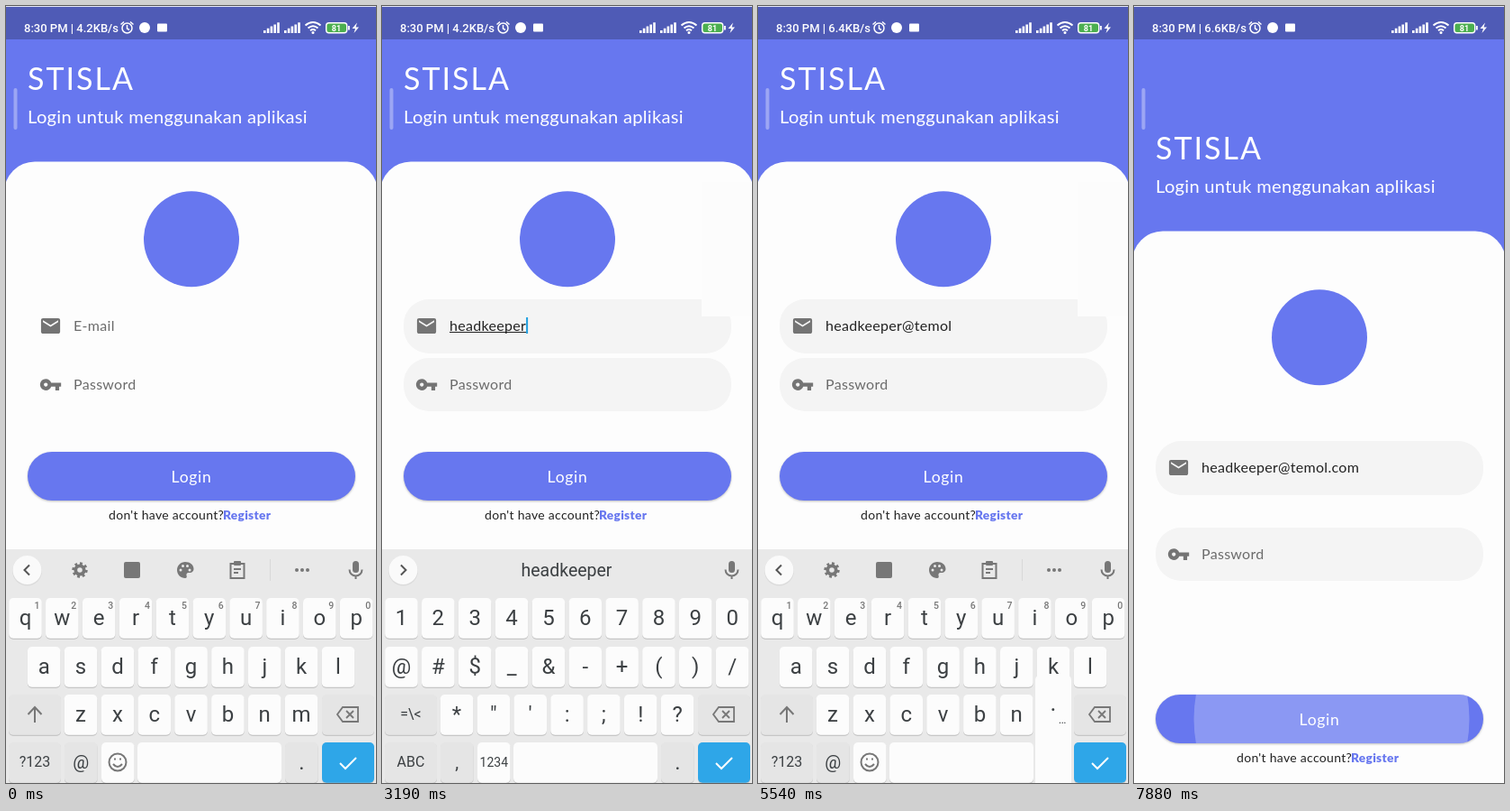
These frames come from a looping animation (411x861 px, 8000 ms). An HTML page:

```html
<!DOCTYPE html>
<html lang="id">
<head>
<meta charset="utf-8">
<title>Login</title>
<style>
html, body { margin: 0; width: 100%; height: 100%; overflow: hidden; background: #6777ef; }
svg { display: block; width: 100vw; height: 100vh; }
text { font-family: Lato, sans-serif; letter-spacing: .3px; white-space: pre; }
.roboto, .kb text { font-family: Roboto, sans-serif; letter-spacing: 0; }
.kb text { fill: #3c4043; text-anchor: middle; }
.title { letter-spacing: 2px; }
.label { letter-spacing: .7px; }
.line { fill: none; stroke: #777; stroke-width: 2; }
.button { filter: drop-shadow(0 1.5px 1px rgba(0, 0, 0, .25)); }
.mid { text-anchor: middle; }
</style>
</head>
<body>
<svg viewBox="0 0 411 861" preserveAspectRatio="none">
  <defs>
    <clipPath id="fieldClip"><path id="reveal"/></clipPath>
    <clipPath id="buttonClip"><rect x="24" y="494" width="364" height="54" rx="27"/></clipPath>
    <path id="mailIcon" d="M20 4H4c-1.1 0-2 .9-2 2v12c0 1.1.9 2 2 2h16c1.1 0 2-.9 2-2V6c0-1.1-.9-2-2-2zm0 4l-8 5-8-5V6l8 5 8-5v2z"/>
    <path id="keyIcon" d="M12.65 10C11.83 7.67 9.61 6 7 6c-3.31 0-6 2.69-6 6s2.69 6 6 6c2.61 0 4.83-1.67 5.65-4H17v4h4v-4h2v-4H12.65zM7 14c-1.1 0-2-.9-2-2s.9-2 2-2 2 .9 2 2-.9 2-2 2z"/>
  </defs>
  <rect width="411" height="861" fill="#6777ef"/>

  <g id="header" fill="#fff">
    <text class="title" x="24" y="92.500" font-size="34">STISLA</text>
    <text x="24" y="130" font-size="20.100">Login untuk menggunakan aplikasi</text>
    <rect x="-2" y="172.500" width="415" height="800" rx="34" fill="#fdfdfd"/>
  </g>

  <g id="statusBar" fill="#fff">
    <rect width="411" height="37" fill="#4f5bb6"/>
    <rect width="411" height="1" fill="#e4e6f4"/>
    <text id="clock" class="roboto" x="20" y="29" font-size="13" font-weight="500"></text>
    <g fill="none" stroke="#fff" stroke-width="1.5">
      <circle cx="134.500" cy="24.500" r="5.500"/>
      <path d="M134.500 21v4l2.500 1.500M127.500 20.500l3.500-3M141.500 20.500l-3.500-3"/>
    </g>
    <circle cx="154" cy="24" r="6"/>
    <rect x="168" y="19.500" width="11" height="9" rx="1"/>
    <path id="bars"/>
    <g fill="none" stroke="#fff" stroke-width="2">
      <path d="M332.500 21.500q8.500-7 17 0M335.500 24.500q5.500-4.500 11 0M338 27.200q3-2.400 6 0"/>
    </g>
    <circle cx="341" cy="29.500" r="1.500"/>
    <rect x="355.700" y="18.700" width="23" height="11" rx="3" fill="#4caf50" stroke="#fff" stroke-width="1.400"/>
    <rect x="380" y="22" width="1.800" height="4.500"/>
    <text class="roboto mid" x="367" y="27.500" font-size="9" font-weight="700">81</text>
    <path d="M390 18.500l-5.500 6.500h3.500l-1.500 5 5.500-6.500h-3.500z"/>
  </g>
  <rect x="8.500" y="91" width="4" height="46" rx="2" fill="#fff" opacity=".35"/>

  <circle id="badge" cx="206" cy="258.200" r="53" fill="#6777ef"/>

  <g clip-path="url(#fieldClip)" fill="#f4f4f4">
    <rect id="mailBox" x="24" y="325" width="364" height="60" rx="28"/>
    <rect id="passBox" x="24" y="390" width="364" height="59" rx="28"/>
  </g>
  <rect id="tile" x="355" y="195" width="56" height="149" fill="#fcfcfc"/>
  <g id="mail">
    <use href="#mailIcon" transform="translate(36.800 341.800) scale(1.060)" fill="#747474"/>
    <text id="hint" x="75" y="360" font-size="16" fill="#6b6b6b">E-mail</text>
    <text id="typed" x="75" y="360" font-size="16" fill="#222"></text>
    <rect id="under" x="75" y="361" height="1" fill="#222"/>
    <rect id="caret" y="345" width="2" height="18" fill="#1e9fe0"/>
  </g>
  <g id="pass">
    <use href="#keyIcon" transform="translate(36.800 406.800) scale(1.060)" fill="#747474"/>
    <text x="75" y="425" font-size="16" fill="#6b6b6b">Password</text>
  </g>
  <g id="action">
    <rect class="button" x="24" y="494" width="364" height="54" rx="27" fill="#6777ef"/>
    <g clip-path="url(#buttonClip)"><circle id="ripple" cx="219.500" cy="521" fill="#fff" opacity=".24"/></g>
    <text class="label mid" x="206" y="528" font-size="17.500" fill="#fff">Login</text>
    <text x="114" y="569" font-size="14" fill="#222">don't have account?</text>
    <text x="241" y="569" font-size="13.700" font-weight="900" fill="#6777ef">Register</text>
  </g>

  <g id="keyboard" class="kb">
    <rect y="602" width="411" height="259" fill="#e9e9e9"/>
    <circle cx="23.500" cy="626" r="16.500" fill="#000" opacity=".06"/>
    <circle cx="23.500" cy="625" r="16" fill="#fafafa"/>
    <path id="chevron" class="line" style="stroke:#555"/>
    <g id="tools" fill="#777">
      <circle cx="82" cy="625" r="4.700" class="line" style="stroke-width:3.800"/>
      <circle cx="82" cy="625" r="7.200" class="line" style="stroke-width:3" pathLength="16" stroke-dasharray="1"/>
      <rect x="131" y="616" width="18" height="18" rx="2"/>
      <path d="M199 616c-5 0-9 4-9 9s4 9 9 9c2 0 2-2 1.500-3-.5-1.500.5-3 2-3h2c2 0 4-2 4-4 0-5-4-8-9.500-8z"/>
      <g id="dabs" fill="#e9e9e9"></g>
      <path class="line" d="M249.500 618h15v16h-15zM253 624h8M253 628h5"/>
      <rect x="253" y="615" width="8" height="5" rx="1"/>
      <rect x="293" y="613" width="1" height="24" fill="#d8d8d8"/>
      <circle cx="323" cy="625" r="2"/><circle cx="329" cy="625" r="2"/><circle cx="335" cy="625" r="2"/>
    </g>
    <text id="suggest" x="205" y="632" font-size="19.500"></text>
    <rect x="385" y="615" width="7" height="13" rx="3.500" fill="#777"/>
    <path class="line" d="M381.500 624.500a7 7 0 0 0 14 0M388.500 631v4"/>
    <g id="letters"></g>
    <g id="symbols"></g>
    <g id="popup"></g>
  </g>
</svg>

<script>
const $ = id => document.getElementById(id);
const LOOP = 8000;
const NAME = 'headkeeper', MAIL = NAME + '@temol.com';
const ROW_Y = [656, 710, 763, 816];
const PITCH = 40.85;
const keyPos = {};

// Keys
function key(x, row, w, label = '', fill = '#fcfcfc', size = 24) {
  const y = ROW_Y[row];
  return `<rect x="${x}" y="${y + 1}" width="${w}" height="45" rx="5" fill="#c6c6c6"/>
    <rect x="${x}" y="${y}" width="${w}" height="44.800" rx="5" fill="${fill}"/>
    <text x="${x + w / 2}" y="${y + 22 + size * .33}" font-size="${size}">${label}</text>`;
}

function keyRow(chars, row, first) {
  return [...chars].map((c, i) => {
    const cx = first + i * PITCH;
    keyPos[c] = [cx, row];
    return key(cx - 18.3, row, 36.6, c.replace('&', '&amp;'));
  }).join('');
}

function sideKeys(left, corner, second, third) {
  const grey = '#e5e5e5';
  keyPos['.'] = [328, 3];
  return key(3, 2, 58, left, grey, 16) + key(351, 2, 58, '', grey) +
    key(3, 3, 58, corner, grey, 16) + key(65, 3, 36.6, second, grey, 20) +
    key(106, 3, 36.6, third, '#fcfcfc', 14) + key(146, 3, 160, '') +
    key(310, 3, 36.6, '.', grey) + key(351, 3, 58, '', '#2ea6e8') +
    `<path class="line" style="stroke-width:1.800" d="M374 777h17v16h-17l-6-8zM378 781l8 8M386 781l-8 8"/>
     <path class="line" style="stroke:#fff;stroke-width:2" d="M371 839l6 6 12-12"/>`;
}

const hints = [...'1234567890'].map((d, i) =>
  `<text x="${34.5 + i * PITCH}" y="668" font-size="10.500" font-weight="500" style="fill:#777">${d}</text>`).join('');

$('letters').innerHTML =
  keyRow('qwertyuiop', 0, 21.5) + hints + keyRow('asdfghjkl', 1, 42.2) +
  keyRow('zxcvbnm', 2, 83) + sideKeys('', '?123', '@', '') +
  `<path class="line" d="M32 794v-16M24.500 785l7.500-8 7.500 8"/>
   <circle class="line" cx="124" cy="838" r="9.500"/>
   <path class="line" d="M119 840q5 6 10 0M120 834.500h2M126 834.500h2"/>`;
$('symbols').innerHTML =
  keyRow('1234567890', 0, 21.5) + keyRow('@#$_&-+()/', 1, 21.5) +
  keyRow('*"\':;!?', 2, 83) + sideKeys('=\\&lt;', 'ABC', ',', '1234');
$('dabs').innerHTML = [[194, 625], [196.5, 620.5], [201.5, 620.5], [204, 625]]
  .map(([x, y]) => `<circle cx="${x}" cy="${y}" r="1.500"/>`).join('');
$('bars').setAttribute('d', [286, 309].map(x => [0, 1, 2, 3, 4].map(i =>
  `M${x + i * 3.8} 30v${-3 - i * 2.2}h2.600V30z`).join('')).join(''));

// Timeline: every entry patches the state before it.
const PART = 'M76 344H411V470H76z';
const steps = [
  [0, { len: 0, caret: false, tools: true, sugg: 0, pop: '', sym: false, line: true,
        reveal: 'M0 0', tile: false, kb: true, shift: 0, ripple: 0, speed: '4.2' }],
  [150, { caret: true }],
  [400, { len: 1, tools: false, sugg: 1, reveal: PART }],
  [520, { len: 2, sugg: 2, pop: 'e' }],
  [670, { len: 3, pop: '' }],
  [940, { sugg: 3 }],
  [1080, { len: 4, sugg: 4 }],
  [1210, { len: 5, sugg: 5, pop: 'k' }],
  [1460, { len: 6, pop: 'e' }],
  [1580, { sugg: 6, pop: '' }],
  [1700, { sugg: 7 }],
  [1970, { reveal: PART + 'M100 325H225V344H100z' }],
  [2090, { len: 7, pop: 'e' }],
  [2230, { len: 8, sugg: 8, pop: 'p' }],
  [2350, { len: 9, sugg: 9, pop: '' }],
  [2480, { len: 10, pop: 'r' }],
  [2600, { sugg: 10, pop: '' }],
  [3190, { sym: true, reveal: 'M0 0H411V861H0z', tile: true }],
  [3650, { len: 11, line: false, sugg: 0, pop: '@', speed: '6.4' }],
  [3800, { tools: true, pop: '' }],
  [3950, { sym: false }],
  [4200, { len: 12, pop: 't' }],
  [4320, { pop: '' }],
  [4470, { len: 13 }],
  [4600, { len: 14 }],
  [4720, { len: 15 }],
  [4840, { len: 16, pop: 'l' }],
  [4990, { pop: '' }],
  [5540, { caret: false, pop: '.' }],
  [5690, { len: 17, caret: true, pop: '' }],
  [5820, { len: 18 }],
  [5950, { len: 19, pop: 'o' }],
  [6060, { len: 20, pop: 'm' }],
  [6170, { pop: '' }],
  [6570, { caret: false, tools: false }],
  [6720, { kb: false, tile: false, shift: .07 }],
  [6870, { shift: 1 }],
  [7640, { ripple: 50, speed: '6.6' }],
  [7760, { ripple: 102 }],
  [7880, { ripple: 153 }]
];

// Distance each part drops when the keyboard closes.
const drops = { header: 77, badge: 109, mailBox: 157, mail: 157, passBox: 188, pass: 188, action: 269 };

const show = (id, on) => $(id).style.display = on ? '' : 'none';
const set = (id, name, value) => $(id).setAttribute(name, value);

function popup(c) {
  if (!c) return '';
  const [cx, row] = keyPos[c], y = ROW_Y[row];
  return `<rect x="${cx - 20}" y="${y - 75}" width="40" height="125" rx="6" fill="#fcfcfc"/>
    <text x="${cx}" y="${y - 35}" font-size="26">${c}</text>` +
    (c === '.' ? `<text x="${cx + 10}" y="${y - 21}" font-size="13">…</text>` : '');
}

function render(s) {
  $('clock').textContent = `8:30 PM | ${s.speed}KB/s`;
  for (const id in drops) set(id, 'transform', `translate(0 ${drops[id] * s.shift})`);
  $('typed').textContent = MAIL.slice(0, s.len);
  const w = s.len ? $('typed').getComputedTextLength() : 0;
  set('under', 'width', s.line ? w : 0);
  set('caret', 'x', 75 + w);
  show('caret', s.caret);
  show('hint', !s.len);
  set('reveal', 'd', s.reveal);
  show('tile', s.tile);
  set('ripple', 'r', s.ripple);
  show('keyboard', s.kb);
  show('tools', s.tools);
  set('chevron', 'd', s.tools ? 'M26 619.500l-5.500 5.500 5.500 5.500' : 'M21 619.500l5.500 5.500-5.500 5.500');
  $('suggest').textContent = NAME.slice(0, s.sugg);
  show('letters', !s.sym);
  show('symbols', s.sym);
  $('popup').innerHTML = popup(s.pop);
}

const start = performance.now();
let last = -1;
function tick() {
  const t = (performance.now() - start) % LOOP;
  const past = steps.filter(([at]) => at <= t);
  if (past.length !== last) {
    last = past.length;
    render(Object.assign({}, ...past.map(([, patch]) => patch)));
  }
  requestAnimationFrame(tick);
}
tick();
</script>
</body>
</html>
```
